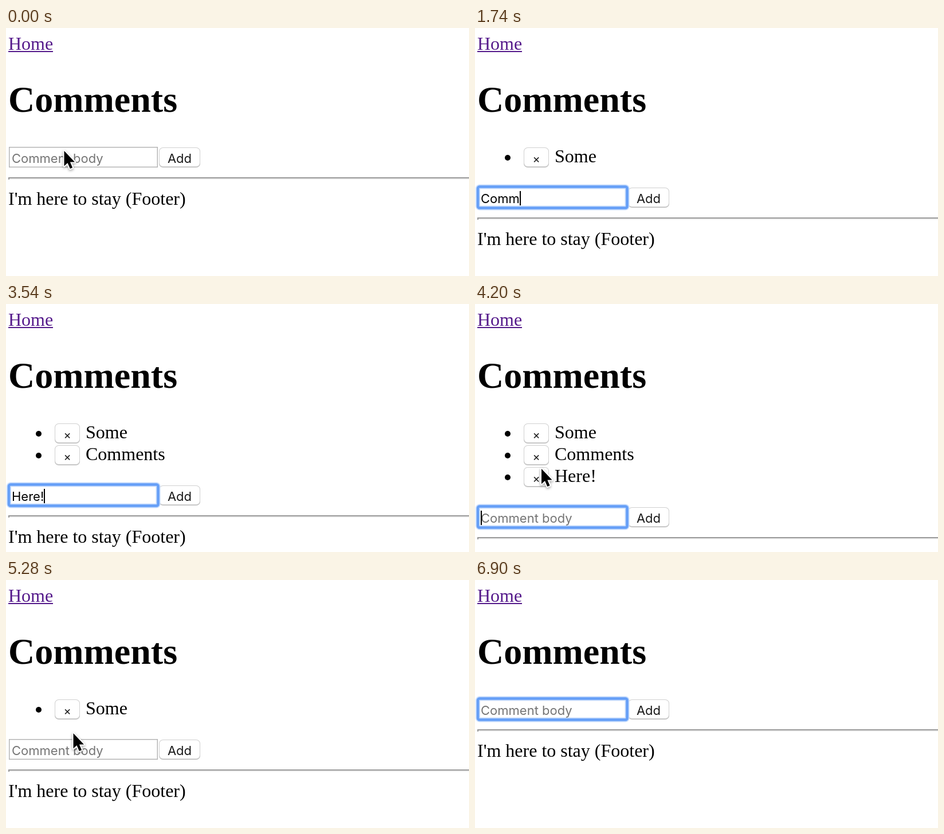
Recreate the animation shown at these times as an HTML page with a canvas. Size 808x432 px, loop 6.96 s.

```html
<!DOCTYPE html>
<html lang="en">
<head>
<meta charset="utf-8">
<title>Comments</title>
<style>
html, body { margin: 0; width: 100%; height: 100%; overflow: hidden; background: #fff; }
canvas { display: block; }
</style>
</head>
<body>
<canvas id="stage" width="808" height="432"></canvas>
<script>
const ctx = document.getElementById('stage').getContext('2d');
const LOOP = 6960, STEP = 60;
const SERIF = '"Liberation Serif", "Times New Roman", serif';
const SANS = 'Inter, Roboto, sans-serif';
const ROW = 38;

// Typing sessions: the time of each letter, then of the Enter key
const entries = [
  { text: 'Some', keys: [780, 900, 960, 1080], enter: 1320, gone: 5880 },
  { text: 'Comments', keys: [1500, 1560, 1680, 1740, 1860, 1920, 2040, 2100], enter: 2220, gone: 5160 },
  { text: 'Here!', keys: [2640, 2820, 2940, 3060, 3300], enter: 3720, gone: 4560 }
];
const focusSpans = [[240, 4500], [6360, LOOP]];

// Pointer waypoints: time, x, y
const paths = [
  [[0, 101, 213], [300, 101, 213], [600, 114, 274], [720, 114, 274]],
  [[4020, 114, 274], [4380, 117, 298], [4800, 117, 298], [5040, 117, 266],
   [5520, 117, 266], [5760, 117, 228], [6420, 117, 228], [6780, 124, 436]]
];

function pointerAt(t) {
  for (const path of paths) {
    for (let i = 1; i < path.length; i++) {
      const [t0, x0, y0] = path[i - 1], [t1, x1, y1] = path[i];
      if (t < t0 || t >= t1) continue;
      const p = (t - t0) / (t1 - t0), e = p * p * (3 - 2 * p);
      return [x0 + (x1 - x0) * e, y0 + (y1 - y0) * e];
    }
  }
  return null;
}

function text(str, x, y, font, color = '#000', align = 'left') {
  ctx.font = font;
  ctx.fillStyle = color;
  ctx.textAlign = align;
  ctx.fillText(str, x, y);
}

function rect(x, y, w, h, color) {
  ctx.fillStyle = color;
  ctx.fillRect(x, y, w, h);
}

function rounded(x, y, w, h, r) {
  ctx.beginPath();
  ctx.roundRect(x, y, w, h, r);
}

function button(x, y, w, label, size) {
  rounded(x, y + 1, w, 34, 7);
  ctx.fillStyle = '#bdbdbd';
  ctx.fill();
  rounded(x, y, w, 34, 7);
  ctx.fillStyle = '#d0d0d0';
  ctx.fill();
  rounded(x + 1, y + 1, w - 2, 32, 6);
  ctx.fillStyle = '#fff';
  ctx.fill();
  text(label, x + w / 2, y + 26.5, size + 'px ' + SANS, '#1a1a1a', 'center');
}

function field(y, value, focused, caret) {
  if (focused) {
    for (const [width, color] of [[8, '#c6dcfc'], [4.5, '#659ff7']]) {
      rounded(5, y - 0.5, 260.5, 37, 3);
      ctx.lineWidth = width;
      ctx.strokeStyle = color;
      ctx.stroke();
    }
  } else {
    rect(5, y, 260, 36, '#b5b5b5');
    rect(6.5, y + 1.5, 257, 33, '#fff');
  }
  const font = '22px ' + SANS;
  text(value || 'Comment body', 10, y + 27.5, font, value ? '#000' : '#757575');
  if (focused && caret) {
    const end = value ? 10 + ctx.measureText(value).width : 10;
    rect(Math.round(end), y + 7, 2, 25, '#000');
  }
}

function pointer(x, y) {
  const shape = [[0, 0], [0, 26.5], [6, 21], [10.3, 31], [14.6, 29.2], [10.4, 19.5], [18.5, 19.5]];
  ctx.save();
  ctx.translate(x + 0.5, y + 1);
  ctx.beginPath();
  shape.forEach(([px, py]) => ctx.lineTo(px, py));
  ctx.closePath();
  ctx.lineJoin = 'round';
  ctx.lineWidth = 4;
  ctx.strokeStyle = '#fff';
  ctx.shadowColor = 'rgba(0,0,0,.35)';
  ctx.shadowBlur = 4;
  ctx.shadowOffsetY = 2;
  ctx.stroke();
  ctx.shadowColor = 'transparent';
  ctx.fillStyle = '#000';
  ctx.fill();
  ctx.restore();
}

function draw(t) {
  const items = entries.filter(e => t >= e.enter && t < e.gone);
  const current = entries.find(e => t >= e.keys[0] && t < e.enter);
  const value = current ? current.text.slice(0, current.keys.filter(k => t >= k).length) : '';
  const span = focusSpans.find(([from, to]) => t >= from && t < to);
  const marks = entries.flatMap(e => [...e.keys, e.enter]).concat(span ? span[0] : 0);
  const last = Math.max(...marks.filter(k => k <= t));
  const caret = (t - last) % 1000 < 500;
  const shift = items.length ? items.length * ROW + 32 : 0;

  rect(0, 0, 808, 432, '#fff');
  text('Home', 4, 38, '32px ' + SERIF, '#551a8b');
  rect(4, 40, 78, 2, '#551a8b');
  text('Comments', 4, 146, 'bold 64px ' + SERIF);

  items.forEach((item, i) => {
    const y = 208 + i * ROW;
    ctx.beginPath();
    ctx.arc(57, y + 18, 5, 0, Math.PI * 2);
    ctx.fillStyle = '#000';
    ctx.fill();
    button(85, y, 44, '×', 20);
    text(item.text, 139, y + 26, '32px ' + SERIF);
  });

  button(267, 208 + shift, 72, 'Add', 22);
  field(207 + shift, value, !!span, caret);
  rect(4, 260 + shift, 804, 2, '#9a9a9a');
  rect(4, 262 + shift, 804, 2, '#eee');
  rect(4, 260 + shift, 2, 4, '#9a9a9a');
  text("I'm here to stay (Footer)", 4, 308 + shift, '32px ' + SERIF);

  const at = pointerAt(t);
  if (at) pointer(...at);
}

function tick() {
  draw(Math.floor((performance.now() % LOOP) / STEP) * STEP);
  requestAnimationFrame(tick);
}
tick();
</script>
</body>
</html>
```
